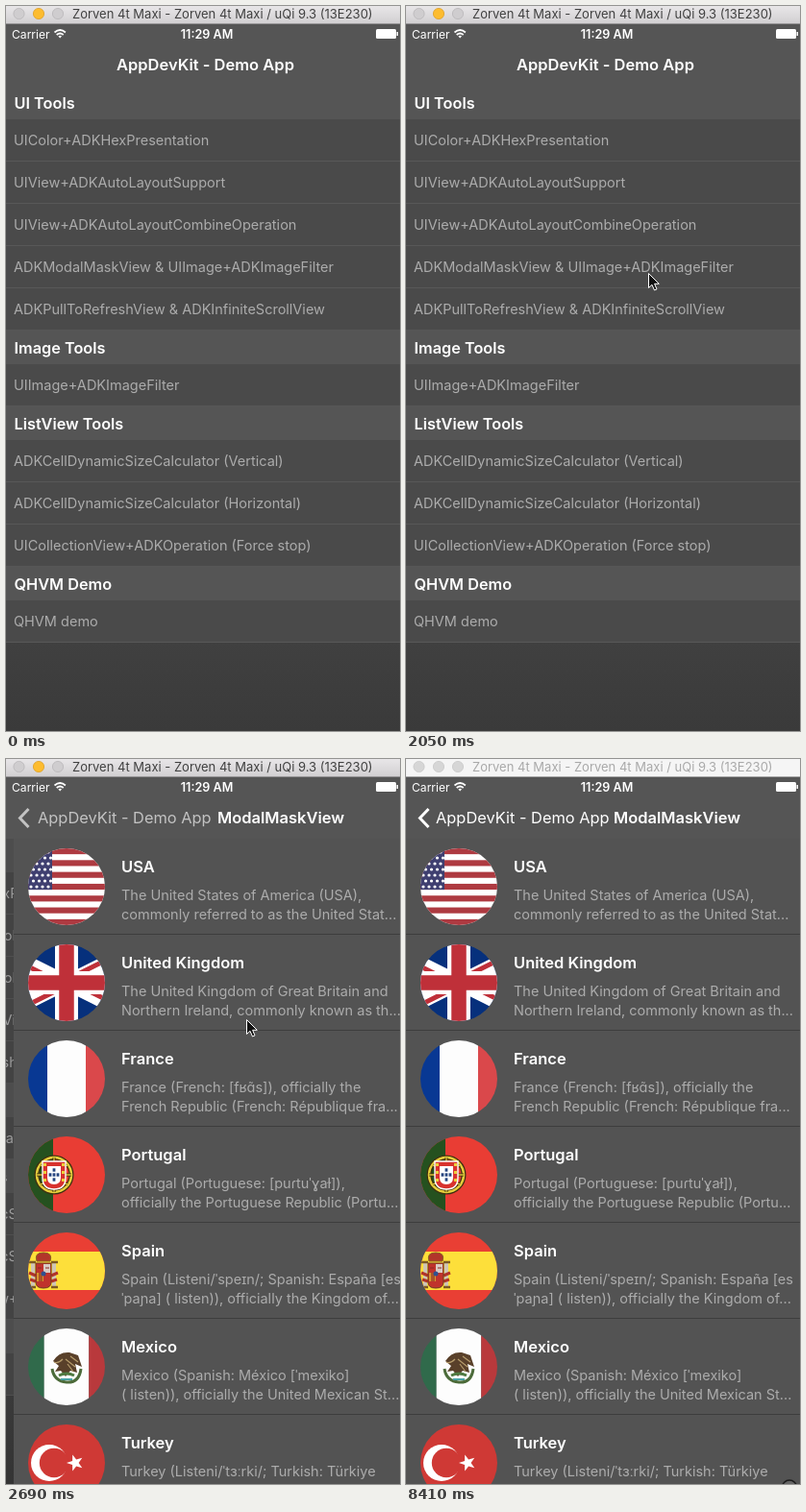
An HTML page for the animation above (8500 ms loop, 410 by 755 pixels).

```html
<!DOCTYPE html>
<html lang="en">
<head>
<meta charset="utf-8">
<title>Demo app</title>
<style>
  html, body { margin: 0; width: 100%; height: 100%; overflow: hidden; background: #535353; }
  svg { display: block; width: 410px; height: 755px; }
  text { font-family: Inter, "Noto Sans", "DejaVu Sans", sans-serif; white-space: pre; fill: #fff; }
  .nav { font-size: 16.5px; font-weight: 600; }
  .back { font-size: 16.4px; }
  .head { font-size: 16.3px; font-weight: 600; }
  .body { font-size: 14.5px; fill: #acacac; }
  .status { font-size: 12.1px; }
  .clock { font-size: 12.6px; font-weight: 600; }
  .window { font-size: 13px; fill: #404040; }
  .inactive .window { fill: #a9a9a9; }
  .inactive .bar { fill: #f5f5f5; }
  .inactive .light { fill: #d6d6d6; stroke: #c8c8c8; }
</style>
</head>
<body>
<svg viewBox="0 0 410 755">
  <defs>
    <linearGradient id="chrome" x2="0" y2="1">
      <stop stop-color="#e8e6e8"/><stop offset="1" stop-color="#d1cfd1"/>
    </linearGradient>
    <linearGradient id="floor" x2="0" y2="1">
      <stop stop-color="#404040"/><stop offset="1" stop-color="#3a3a3a"/>
    </linearGradient>
    <clipPath id="disc"><circle r="40"/></clipPath>
  </defs>

  <g id="list"></g>
  <rect id="dim" y="83" width="410" height="672"/>
  <g id="detail"></g>

  <rect y="18" width="410" height="65" fill="#555"/>
  <text class="status" x="6" y="34">Carrier</text>
  <g fill="none" stroke="#fff" stroke-width="1.7">
    <path d="M50.5 27.5q5.7 -5 11.4 0M52.7 30q3.5 -3 7 0"/>
    <path d="M54.4 31.4q1.8 -1.4 3.6 0l-1.8 2z" fill="#fff" stroke="none"/>
  </g>
  <text class="clock" x="209" y="34" text-anchor="middle">11:29 AM</text>
  <rect x="385" y="24" width="21" height="10" rx="1.5" fill="#fff"/>
  <rect x="406.5" y="27" width="1.5" height="4" fill="#fff"/>

  <text id="oldTitle" class="nav" y="67">AppDevKit - Demo App</text>
  <path id="chevron" d="M23.5 52l-9 9.5 9 9.5" fill="none" stroke="#fff" stroke-width="3"/>
  <text id="backLabel" class="back" y="67">AppDevKit - Demo App</text>
  <text id="newTitle" class="nav" y="67">ModalMaskView</text>

  <g id="chrome-bar">
    <rect class="bar" width="410" height="18.5" fill="url(#chrome)"/>
    <g stroke-width=".8">
      <circle class="light" cx="13.5" cy="8" r="5.6" fill="#cfcdcf" stroke="#b9b7b9"/>
      <circle class="light" cx="34" cy="8" r="5.6" fill="#fdbc2f" stroke="#dfa023"/>
      <circle class="light" cx="54" cy="8" r="5.6" fill="#cfcdcf" stroke="#b9b7b9"/>
    </g>
    <text class="window" x="69" y="13">Zorven 4t Maxi - Zorven 4t Maxi / uQi 9.3 (13E230)</text>
  </g>

  <path id="cursor" d="M.5 .5V15.5L4 12.3 6.5 18 9 16.9 6.6 11.3H11.3Z" fill="#111" stroke="#fff"/>
  <circle id="ring" cx="399" cy="758.5" r="7.5" fill="#666" stroke="#1c1c1c" stroke-width="1.6"/>
</svg>
<script>
const $ = id => document.getElementById(id);
const rect = (x, y, w, h, fill) => `<rect x="${x}" y="${y}" width="${w}" height="${h}" fill="${fill}"/>`;
const circle = (x, y, r, fill, more = '') => `<circle cx="${x}" cy="${y}" r="${r}" fill="${fill}" ${more}/>`;
const line = (d, stroke, width) => `<path d="${d}" fill="none" stroke="${stroke}" stroke-width="${width}"/>`;
const label = (cls, x, y, s) => `<text class="${cls}" x="${x}" y="${y}">${s}</text>`;
const repeat = (n, f) => Array.from({ length: n }, (_, i) => f(i)).join('');

// First page: sections of rows
const sections = [
  [83, 'UI Tools', ['UIColor+ADKHexPresentation', 'UIView+ADKAutoLayoutSupport',
    'UIView+ADKAutoLayoutCombineOperation', 'ADKModalMaskView &amp; UIImage+ADKImageFilter',
    'ADKPullToRefreshView &amp; ADKInfiniteScrollView']],
  [338, 'Image Tools', ['UIImage+ADKImageFilter']],
  [417, 'ListView Tools', ['ADKCellDynamicSizeCalculator (Vertical)',
    'ADKCellDynamicSizeCalculator (Horizontal)', 'UICollectionView+ADKOperation (Force stop)']],
  [584, 'QHVM Demo', ['QHVM demo']]
];
$('list').innerHTML = rect(0, 83, 410, 580, '#4a4a4a') + rect(0, 662, 410, 93, 'url(#floor)') +
  sections.map(([y, title, rows]) =>
    rect(0, y - 0.5, 410, 35.5, '#555') + label('head', 8.5, y + 24, title) +
    rows.map((s, i) => label('body', 8, y + 62 + i * 44, s) +
      rect(0, y + 78 + i * 44, 410, 1, '#585858')).join('')).join('');

// Flags, centred on 0,0 and cropped to a disc of radius 40
const bands = (a, b, c, x) => rect(-40, -40, 40 - x, 80, a) + rect(-x, -40, 2 * x, 80, b) + rect(x, -40, 40 - x, 80, c);

const usa = () => rect(-40, -40, 80, 80, '#fff') +
  repeat(7, i => rect(-40, -40 + i * 12.31, 80, 6.15, '#ae3a41')) +
  rect(-40, -40, 25, 43.1, '#3f3f70') +
  repeat(28, i => circle(-37 + i % 4 * 6 + (i / 4 & 1) * 2.5, -36 + (i / 4 | 0) * 6, 1.6, '#fff'));

const uk = () => rect(-40, -40, 80, 80, '#06307c') +
  line('M-80 -40L80 40M-80 40L80 -40', '#fff', 15) +
  line('M-80 -37L0 3M80 37L0 -3M-80 43L0 3M80 -43L0 -3', '#bf3039', 5) +
  line('M0 -40V40M-40 0H40', '#fff', 24) + line('M0 -40V40M-40 0H40', '#bf3039', 15.5);

const portugal = () => rect(-40, -40, 80, 80, '#e93d34') + rect(-40, -40, 26, 80, '#25511f') +
  circle(-13, 0, 18, 'none', 'stroke="#40300f" stroke-width="5"') +
  circle(-13, 0, 18, 'none', 'stroke="#e6cf3c" stroke-width="2.5"') +
  line('M-31 0H5M-13 -18V18M-27 -10Q-13 -3 1 -10M-27 10Q-13 3 1 10', '#40300f', 3) +
  line('M-31 0H5M-13 -18V18M-27 -10Q-13 -3 1 -10M-27 10Q-13 3 1 10', '#d9c23a', 1.4) +
  '<path d="M-25 -14H-1V3Q-1 15 -13 15T-25 3Z" fill="#d8322e" stroke="#fff" stroke-width="1.4"/>' +
  '<path d="M-20 -9H-6V3Q-6 10 -13 10T-20 3Z" fill="#fff"/>' +
  [[-13, -5], [-13, 0], [-13, 5], [-17, 0], [-9, 0]].map(([x, y]) => rect(x - 1.4, y - 1.7, 2.8, 3.4, '#27457f')).join('') +
  repeat(6, i => rect(i % 2 ? -5 : -24, -12 + (i >> 1) * 8, 3, 3, '#ecd03c'));

const spain = () => rect(-40, -40, 80, 80, '#e93f34') + rect(-40, -20, 80, 40, '#fddf3a') +
  rect(-37, -8, 4, 24, '#cfc6b4') + rect(-15, -8, 4, 24, '#cfc6b4') +
  line('M-39 -9H-32M-16 -9H-9M-39 17H-32M-16 17H-9', '#7d5a22', 2.5) +
  line('M-39 2L-32 5M-16 5L-9 2M-38 9L-32 11M-16 11L-10 9', '#b23328', 3) +
  '<path d="M-32 -8H-16V12Q-16 18 -24 18T-32 12Z" fill="#c0332c" stroke="#6e3a22"/>' +
  rect(-24, -7, 7, 9, '#d9cbc4') + rect(-31, 2, 7, 9, '#d8952f') +
  line('M-28 2V11M-26 2V11M-30 -3H-26M-22 -3H-18', '#8a2b24', 1.2) + circle(-24, 3, 2.5, '#31508f') +
  '<path d="M-31 -10Q-34 -19 -24 -19T-17 -10Z" fill="#b2352a" stroke="#8a6322"/>';

const mexico = () => bands('#306a4b', '#fdfdfd', '#b9393c', 23.3) +
  line('M-15 2Q-13 15 0 16T15 2', '#4c6b3a', 3) +
  '<path d="M-14 -6Q-8 -16 3 -15L12 -12 16 0 9 -3 11 6 4 4 -1 10 -6 4 -12 5 -8 -1Z" fill="#59402a"/>' +
  line('M-13 -5Q-9 -3 -4 -8M-1 -8L9 0M1 -3L7 5M4 -11L12 -5', '#b49a6a', 1.2) +
  line('M-8 9Q0 5 8 9', '#4f7a42', 3) + line('M-6 13H6', '#4aa3a6', 2);

const star = repeat(10, i => {
  const r = i % 2 ? 3.6 : 9, a = Math.PI * (1 + i / 5);
  return `${9 + r * Math.cos(a)},${r * Math.sin(a)} `;
});
const turkey = () => rect(-40, -40, 80, 80, '#cf3935') + circle(-18, 0, 19, '#fff') +
  circle(-13, 0, 15.2, '#cf3935') + `<polygon points="${star}" fill="#fff"/>`;

// Second page
const countries = [
  ['USA', usa, 'The United States of America (USA),', 'commonly referred to as the United Stat...'],
  ['United Kingdom', uk, 'The United Kingdom of Great Britain and', 'Northern Ireland, commonly known as th...'],
  ['France', () => bands('#083893', '#fdfdfd', '#da484b', 20),
    'France (French: [fʁɑ̃s]), officially the', 'French Republic (French: République fra...'],
  ['Portugal', portugal, 'Portugal (Portuguese: [puɾtuˈɣaɫ]),', 'officially the Portuguese Republic (Portu...'],
  ['Spain', spain, 'Spain (Listeni/ˈspeɪn/; Spanish: España [es', 'ˈpaɲa] ( listen)), officially the Kingdom of...'],
  ['Mexico', mexico, 'Mexico (Spanish: México [ˈmexiko]', '( listen)), officially the United Mexican St...'],
  ['Turkey', turkey, 'Turkey (Listeni/ˈtɜːrki/; Turkish: Türkiye', '']
];
$('detail').innerHTML = rect(0, 83, 410, 672, '#535353') +
  countries.map(([name, flag, a, b], i) => `<g transform="translate(0 ${i * 100})">
    <g transform="translate(55 133)" clip-path="url(#disc)">${flag()}</g>
    ${label('nav', 112, 118, name)}${label('body', 112, 147, a)}${label('body', 112, 167, b)}
    ${rect(0, 182, 410, 1, '#3d3d3d')}</g>`).join('');

// Pointer path: time, x, y
const path = [
  [140, 283, -14], [310, 259, 277], [490, 259, 277], [660, 242, 384], [720, 240, 387],
  [1050, 250, 260], [1320, 251, 309], [1350, 251, 309], [1590, 251, 271], [1800, 251, 271],
  [2050, 252, 278], [2200, 250, 271], [7269, 250, 271], [7270, 271, 290], [7380, 313, 375],
  [7560, 313, 375], [7640, 394, 589], [8410, 394, 589]
];
const clamp = v => Math.max(0, Math.min(1, v));
const show = (id, on) => $(id).setAttribute('opacity', +on);
const move = (id, x, y = 0) => $(id).setAttribute('transform', `translate(${Math.round(x)} ${Math.round(y)})`);

function pointerAt(t) {
  const i = Math.max(1, path.findIndex(k => k[0] >= t));
  const [t0, x0, y0] = path[i - 1], [t1, x1, y1] = path[i];
  const k = clamp((t - t0) / (t1 - t0));
  return [x0 + (x1 - x0) * k, y0 + (y1 - y0) * k];
}

function draw() {
  const t = performance.now() % 8500;
  const left = t >= 8410;

  // The push advances in 60 ms steps near its end
  const step = t < 2570 ? t : t < 2840 ? t - (t - 2570) % 60 : 2840;
  const u = clamp((step - 2130) / 710);
  const p = 1 - (1 - u) ** 2.55;
  move('list', -123 * p);
  move('detail', 410 * (1 - p));
  show('dim', 0.1 * p);
  move('oldTitle', 115 - 84 * p);
  move('backLabel', 31 + 84 * (1 - p));
  move('newTitle', 216 + 200 * (1 - p));
  show('oldTitle', clamp(1 - 2 * u));
  show('newTitle', clamp(1.8 * u));
  const fade = clamp((u - 0.5) / 0.45);
  show('backLabel', fade);
  show('chevron', fade);

  show('cursor', t >= 140 && !left);
  if (!left) move('cursor', ...pointerAt(t));
  show('ring', left);
  $('chrome-bar').setAttribute('class', left ? 'inactive' : '');
  requestAnimationFrame(draw);
}
draw();
</script>
</body>
</html>
```
